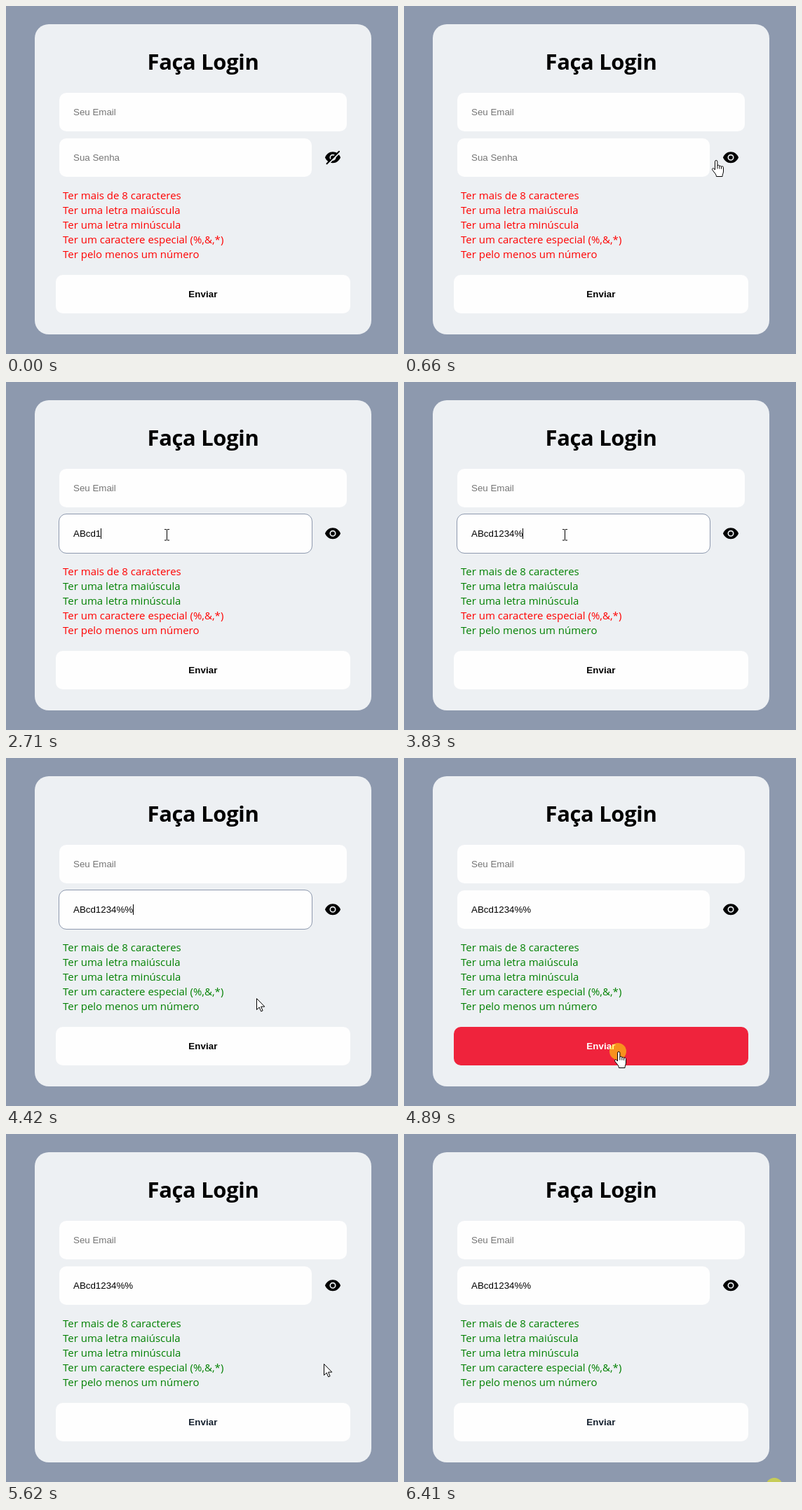
An HTML page for the animation above (6.48 s loop, 559 by 497 pixels).

```html
<!DOCTYPE html>
<html lang="pt-BR">
<head>
<meta charset="utf-8">
<title>Faça Login</title>
<style>
  html, body { margin: 0; width: 100%; height: 100%; overflow: hidden; background: #8d99ae; }
  svg { display: block; width: 559px; height: 497px; }
  text { white-space: pre; }
  .title { font: 700 31px "Open Sans", "Noto Sans", sans-serif; letter-spacing: -.35px; text-anchor: middle; }
  .rule { font: 400 15px "Open Sans", "Noto Sans", sans-serif; }
  .input { font: 13.333px "Liberation Sans", Arial, sans-serif; }
  .send { font: 700 13.333px "Liberation Sans", Arial, sans-serif; letter-spacing: .1px; text-anchor: middle; }
  .hint { fill: #757575; }
  .box { fill: #fefefe; }
  .cursor path { fill: #fff; stroke: #000; stroke-linejoin: round; }
  .cursor .line { fill: none; }
</style>
</head>
<body>
<svg viewBox="0 0 559 497">
  <rect width="559" height="497" fill="#8d99ae"/>
  <rect x="41" y="26" width="480" height="443" rx="20" fill="#edf0f3"/>
  <text class="title" x="281" y="91">Faça Login</text>

  <rect class="box" x="76" y="124" width="410" height="55" rx="10"/>
  <text class="input hint" x="96" y="156">Seu Email</text>

  <rect class="box" x="76" y="189" width="360" height="55" rx="10"/>
  <rect id="focus" class="box" x="75.5" y="188.5" width="361" height="56" rx="10.5" stroke="#8d99ae"/>
  <text id="hint" class="input hint" x="96" y="221">Sua Senha</text>
  <text id="typed" class="input" x="96" y="221"></text>
  <rect id="caret" y="209" width="1" height="15"/>

  <g transform="translate(466 216.3)">
    <path d="M-11 0C-9.3-4.7-5-8 0-8S9.3-4.7 11 0C9.3 4.7 5 8 0 8S-9.3 4.7-11 0z"/>
    <circle r="3.7" fill="none" stroke="#edf0f3" stroke-width="1.7"/>
    <g id="slash" stroke-width="2" stroke-linecap="round">
      <path d="M-6.5 9.5L10.5-7.5" stroke="#edf0f3"/>
      <path d="M-8.5 9L9-8.5" stroke="#000"/>
    </g>
  </g>

  <g id="rules"></g>

  <rect id="button" x="71" y="384" width="420" height="55" rx="10"/>
  <text id="send" class="send" x="281" y="416">Enviar</text>

  <circle id="ring" r="12" fill="#ff0" fill-opacity=".5"/>
  <g id="pointer" class="cursor">
    <path id="arrow" d="M.5.5V16.5l3.7-3.5 2.5 5.800 2.400-1-2.500-5.700h5.200z"/>
    <g id="hand" transform="translate(-6 0)">
      <path d="M5.500 14V2.200a1.700 1.700 0 0 1 3.400 0V8.500a1.500 1.500 0 0 1 3 .6a1.500 1.500 0 0 1 2.800 .7a1.500 1.500 0 0 1 2.800 .7V16c0 3-1.500 4-1.500 7.500H7.500c0-3-3-5.500-5.500-9c-1.500-2.300 1-3.600 2.300-2z"/>
      <path class="line" d="M8.900 8.500v4M11.900 9.100v3.500M14.700 9.800v3"/>
    </g>
    <path id="beam" class="line" d="M-3-7.500H0M1-7.500H4M.5-7V7.500M-3 8H0M1 8H4"/>
  </g>
</svg>
<script>
const LOOP = 6480, TICK = 66, BLINK = 530, HOLD = 70;
const REVEAL = 530, FOCUS = 730, BLUR = 4890, STOP = 6410;
const CLICKS = [REVEAL, FOCUS, BLUR, STOP];

// The password is typed in pairs, each pair in one quick stroke.
const PASSWORD = "ABcd1234%%", STROKE = 200;
const KEYS = [1450, 1980, 2520, 2840, 3830].flatMap(t => [t, t + STROKE]);

const RULES = [
  ["Ter mais de 8 caracteres", s => s.length >= 8],
  ["Ter uma letra maiúscula", s => /[A-Z]/.test(s)],
  ["Ter uma letra minúscula", s => /[a-z]/.test(s)],
  ["Ter um caractere especial (%,&,*)", s => /[%&*]/.test(s)],
  ["Ter pelo menos um número", s => /\d/.test(s)]
];

// Stops of the pointer: tick, x, y
const STOPS = [
  [2, 523, 485], [7, 466, 217], [9, 464, 217], [10, 444, 220],
  [11, 305, 217], [13, 229, 218], [61, 229, 218], [67, 357, 343],
  [70, 305, 419], [75, 305, 419], [85, 453, 328], [93, 517, 484], [97, 528, 503]
];

const $ = id => document.getElementById(id);
const show = (id, on) => $(id).setAttribute("visibility", on ? "visible" : "hidden");
const lerp = (a, b, k) => Math.round(a + (b - a) * k);
const inside = ([x, y], l, t, r, b) => x >= l && x <= r && y >= t && y <= b;
const onEye = p => inside(p, 440, 203, 482, 230);
const onButton = p => inside(p, 71, 384, 491, 439);
const onField = p => inside(p, 76, 189, 436, 244);

const ruleNodes = RULES.map(([label], i) => {
  const node = document.createElementNS("http://www.w3.org/2000/svg", "text");
  node.setAttribute("class", "rule");
  node.setAttribute("x", 81);
  node.setAttribute("y", 276 + 21 * i);
  node.textContent = label;
  $("rules").append(node);
  return node;
});

// The pointer moves once per tick.
function pointerAt(t) {
  const tick = Math.floor((t + 4) / TICK);
  const i = STOPS.findIndex(s => s[0] > tick);
  if (i === 0) return null;
  if (i < 0) return STOPS.at(-1).slice(1);
  const [t0, x0, y0] = STOPS[i - 1], [t1, x1, y1] = STOPS[i];
  const k = (tick - t0) / (t1 - t0);
  return [lerp(x0, x1, k), lerp(y0, y1, k)];
}

function drawField(t) {
  const count = KEYS.filter(k => k <= t).length;
  const focused = t >= FOCUS && t < BLUR;
  const last = count ? KEYS[count - 1] : FOCUS;
  $("typed").textContent = PASSWORD.slice(0, count);
  show("hint", !count);
  show("focus", focused);
  show("caret", focused && (t - last) % (2 * BLINK) < BLINK);
  $("caret").setAttribute("x", Math.floor(96 + (count ? $("typed").getComputedTextLength() : 0)));
  // Checks run on key press, before the new character lands.
  const checked = PASSWORD.slice(0, Math.max(0, count - 1));
  RULES.forEach(([, test], i) => ruleNodes[i].setAttribute("fill", test(checked) ? "green" : "red"));
}

function drawButton(t, p) {
  const hover = p && onButton(p);
  const ink = t < BLUR ? "#000" : "#14202e";
  $("button").setAttribute("fill", hover ? "#ef233c" : "#fefefe");
  $("send").setAttribute("fill", hover ? "#fff" : ink);
}

function drawPointer(t, p) {
  const kind = p && (onEye(p) || onButton(p) ? "hand" : onField(p) ? "beam" : "arrow");
  for (const id of ["arrow", "hand", "beam"]) show(id, id === kind);
  show("ring", p && CLICKS.some(c => t >= c && t < c + HOLD));
  if (!p) return;
  for (const id of ["pointer", "ring"]) $(id).setAttribute("transform", `translate(${p})`);
}

function draw(t) {
  const p = pointerAt(t);
  show("slash", t < REVEAL);
  drawField(t);
  drawButton(t, p);
  drawPointer(t, p);
}

const start = performance.now();
function frame() {
  draw((performance.now() - start) % LOOP);
  requestAnimationFrame(frame);
}
frame();
</script>
</body>
</html>
```
